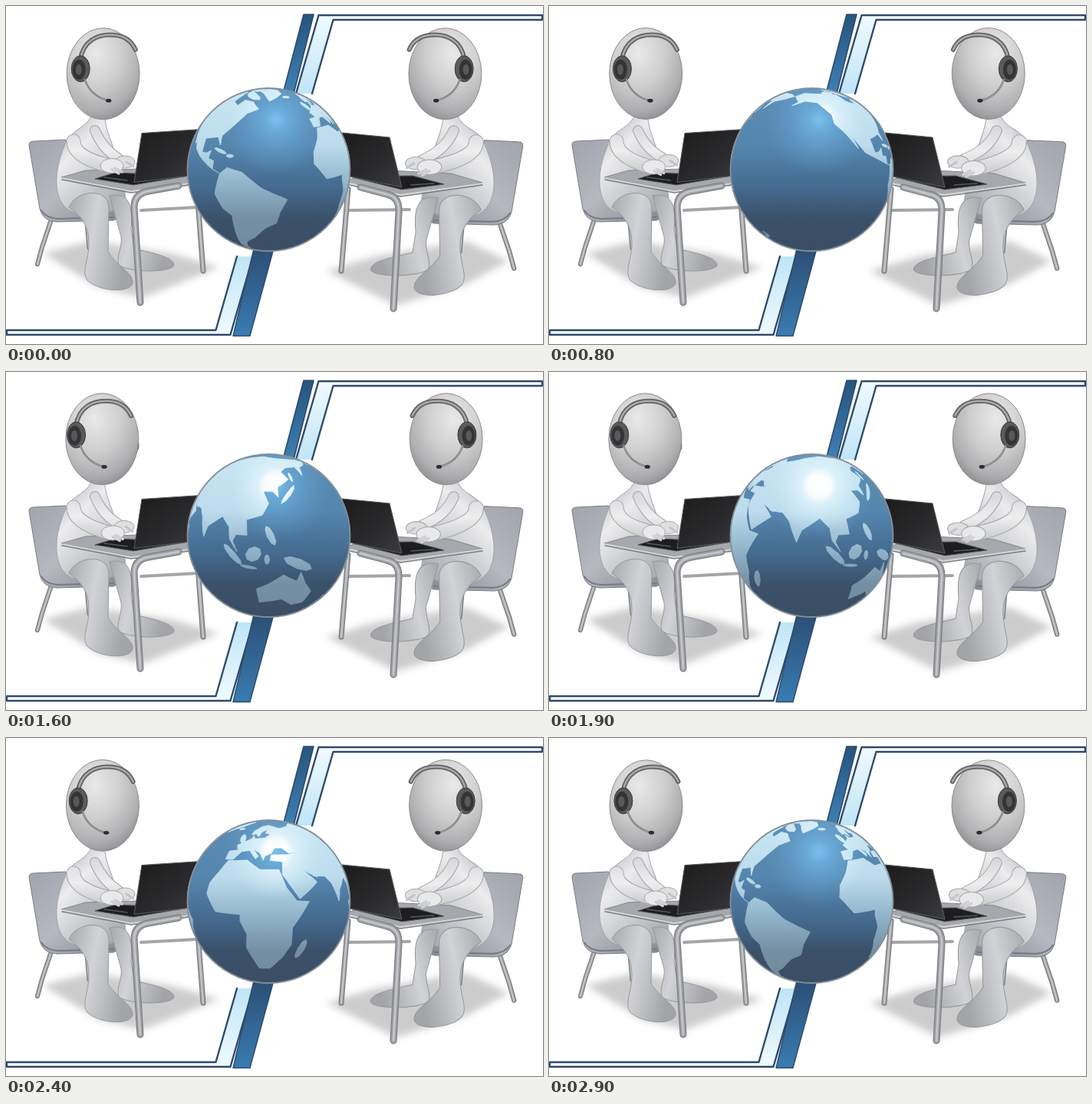
These frames come from a looping animation (700x440 px, 3000 ms). An HTML page:

```html
<!DOCTYPE html>
<html lang="en">
<head>
<meta charset="utf-8">
<title>Online support</title>
<style>
html, body { margin: 0; width: 100%; height: 100%; overflow: hidden; background: #fff; }
svg { display: block; width: 700px; height: 440px; }
</style>
</head>
<body>
<svg id="stage" viewBox="0 0 700 440" xmlns="http://www.w3.org/2000/svg">
<defs>
  <radialGradient id="skin" cx=".4" cy=".28" r=".78">
    <stop offset="0" stop-color="#e9e9e9"/><stop offset=".45" stop-color="#cfcfd0"/>
    <stop offset=".8" stop-color="#aeaeb0"/><stop offset="1" stop-color="#8a8a8d"/>
  </radialGradient>
  <linearGradient id="torso" x1="66" x2="156" y1="160" y2="250" gradientUnits="userSpaceOnUse">
    <stop offset="0" stop-color="#b9babd"/><stop offset=".3" stop-color="#ececee"/><stop offset="1" stop-color="#a9abb0"/>
  </linearGradient>
  <linearGradient id="leg" x1="0" x2="1" y1="0" y2=".3">
    <stop offset="0" stop-color="#a6a8ac"/><stop offset=".45" stop-color="#d2d3d6"/><stop offset="1" stop-color="#a2a4a8"/>
  </linearGradient>
  <linearGradient id="arm" x1="0" x2="0" y1="155" y2="222" gradientUnits="userSpaceOnUse">
    <stop offset="0" stop-color="#d6d7d9"/><stop offset=".5" stop-color="#eeeeef"/><stop offset="1" stop-color="#c2c3c6"/>
  </linearGradient>
  <linearGradient id="chair" x1="0" x2="1" y1="0" y2="1">
    <stop offset="0" stop-color="#a2a4ad"/><stop offset=".5" stop-color="#b6b8c0"/><stop offset="1" stop-color="#85878f"/>
  </linearGradient>
  <linearGradient id="screen" x1="0" x2="1" y1="0" y2="1">
    <stop offset="0" stop-color="#1b1b1c"/><stop offset=".6" stop-color="#2b2b2d"/><stop offset="1" stop-color="#3c3c3f"/>
  </linearGradient>
  <linearGradient id="bandTop" x1="0" x2="0" y1="0" y2="1">
    <stop offset="0" stop-color="#25557f"/><stop offset="1" stop-color="#3f80b3"/>
  </linearGradient>
  <linearGradient id="bandLow" x1="0" x2="0" y1="0" y2="1">
    <stop offset="0" stop-color="#2b4d72"/><stop offset="1" stop-color="#397cb2"/>
  </linearGradient>
  <linearGradient id="pale" x1="0" x2="0" y1="0" y2="1">
    <stop offset="0" stop-color="#f0fafe"/><stop offset="1" stop-color="#bfe5f6"/>
  </linearGradient>
  <linearGradient id="sea" x1="0" x2="0" y1="0" y2="1">
    <stop offset="0" stop-color="#5c8cb3"/><stop offset=".35" stop-color="#5586ae"/>
    <stop offset=".62" stop-color="#44698d"/><stop offset=".8" stop-color="#3a516a"/><stop offset="1" stop-color="#3a4e64"/>
  </linearGradient>
  <radialGradient id="seaGlow" cx="352" cy="148" r="72" gradientUnits="userSpaceOnUse">
    <stop offset="0" stop-color="#7cc0ee"/><stop offset=".2" stop-color="#6dafde" stop-opacity=".9"/>
    <stop offset="1" stop-color="#5f9ac8" stop-opacity="0"/>
  </radialGradient>
  <linearGradient id="land" x1="0" x2="0" y1="107" y2="319" gradientUnits="userSpaceOnUse">
    <stop offset="0" stop-color="#c9e6f3"/><stop offset=".35" stop-color="#bcdcec"/>
    <stop offset=".6" stop-color="#8fb2c8"/><stop offset=".8" stop-color="#748fa4"/><stop offset="1" stop-color="#71899c"/>
  </linearGradient>
  <radialGradient id="landGlow" cx="352" cy="148" r="62" gradientUnits="userSpaceOnUse">
    <stop offset="0" stop-color="#fff"/><stop offset=".25" stop-color="#fff" stop-opacity=".9"/>
    <stop offset=".4" stop-color="#e2f5fd" stop-opacity=".75"/><stop offset="1" stop-color="#d3effb" stop-opacity="0"/>
  </radialGradient>
  <filter id="soft" x="-20%" y="-20%" width="140%" height="140%"><feGaussianBlur stdDeviation="5"/></filter>
</defs>
<g id="scene"></g>
</svg>
<script>
// Coarse coastlines as longitude, latitude pairs
const northAmerica = [-168,66,-156,71,-95,68,-94,59,-82,55,-78,61,-65,59,-56,52,-66,48,-70,43,-76,36,-81,31,-80,25,
  -84,30,-97,28,-96,19,-91,19,-87,21,-88,16,-83,15,-83,10,-77,8,-86,11,-97,16,-105,20,-113,31,-110,23,-118,34,
  -124,40,-124,47,-135,58,-150,60,-164,55,-158,59];
const greenland = [-45,60,-54,70,-68,76,-45,83,-18,78,-22,70];
const southAmerica = [-77,8,-72,12,-62,10,-50,1,-35,-6,-39,-14,-41,-22,-48,-26,-57,-36,-65,-42,-68,-50,-68,-55,
  -74,-50,-71,-30,-70,-18,-76,-14,-81,-5];
const africa = [-6,36,10,37,20,31,33,31,37,20,43,12,51,11,40,-4,40,-15,35,-24,27,-34,19,-34,12,-17,13,-8,9,0,9,4,
  -8,4,-17,14,-16,21,-10,29];
const europe = [-9,37,-9,43,-1,44,-4,48,8,54,9,57,12,54,22,55,28,59,22,60,25,65,17,61,15,56,11,59,6,58,6,62,15,69,
  26,71,42,66,60,69,61,44,42,42,37,46,31,46,28,42,23,40,22,37,19,42,13,45,18,40,16,38,10,44,3,43,-2,37];
const asia = [59,69,72,73,105,77,140,72,180,69,190,66,178,62,163,59,157,51,156,60,142,59,135,55,140,48,129,42,129,35,
  125,39,118,39,122,31,118,24,108,21,109,12,102,12,100,8,103,2,98,9,97,16,91,22,80,15,77,8,72,20,67,25,57,26,59,45];
const nearEast = [61,45,60,25,50,30,56,25,59,22,45,13,35,28,36,36,27,37,28,41,41,41];
const australia = [114,-22,122,-18,131,-12,136,-15,140,-17,142,-11,146,-19,153,-27,150,-37,140,-38,131,-31,115,-34];

// Island: an ellipse with half axes and turn, all in degrees
function island(lon, lat, a, b, turn) {
  const pts = [], t = turn * rad;
  for (let i = 0; i < 8; i++) {
    const u = a * Math.cos(i * Math.PI / 4), v = b * Math.sin(i * Math.PI / 4);
    pts.push(lon + (u * Math.cos(t) - v * Math.sin(t)) / Math.cos(lat * rad), lat + u * Math.sin(t) + v * Math.cos(t));
  }
  return pts;
}

const CX = 342.5, CY = 213, R = 106, CAM = 5, LOOP = 3000, STEP = 100;
const rad = Math.PI / 180, tilt = 12 * rad;

const caribbean = [island(-79, 21.5, 5, 1, -15), island(-71, 19, 2.5, 1, 0)];
const arctic = [island(-75, 68, 9, 3, -45), island(-80, 79, 5, 4, 0), island(-110, 71, 4, 3, 0)];
const atlantic = [island(-2, 54, 4.5, 1.8, 110), island(-19, 65, 2.5, 1.3, 0), island(47, -19, 7, 2.4, 70)];
const pacific = [island(137, 37, 8, 1.3, 50), island(143, 50, 4, .8, 90), island(176, -39, 3, 1.4, -50), island(171, -44, 4.5, 1.3, 45)];
const indies = [island(123, 12, 6, 2, 115), island(113, 1, 5, 4, 40), island(100, 0, 8, 2, -45),
  island(110, -7, 5, .8, -8), island(121, -2, 3, 1.5, 90), island(140, -5.5, 10, 3, -25)];
const coasts = [northAmerica, greenland, southAmerica, africa, europe, asia, nearEast, australia,
  ...caribbean, ...arctic, ...atlantic, ...pacific, ...indies];

const line = (d, color, w) =>
  `<path d="${d}" fill="none" stroke="${color}" stroke-width="${w}" stroke-linecap="round" stroke-linejoin="round"/>`;
const area = (d, fill, stroke = 'none', w = 1) =>
  `<path d="${d}" fill="${fill}" stroke="${stroke}" stroke-width="${w}" stroke-linejoin="round"/>`;
const oval = (x, y, rx, ry, fill, stroke = 'none') =>
  `<ellipse cx="${x}" cy="${y}" rx="${rx}" ry="${ry}" fill="${fill}" stroke="${stroke}"/>`;
const disc = more => `<circle cx="${CX}" cy="${CY}" r="${R}" ${more}/>`;
const tube = (d, w) => line(d, '#77797c', w) + line(d, '#9b9da0', w - 2) + line(d, '#c3c5c8', w / 3);
const limb = (d, w) => line(d, '#a5a7ab', w) + line(d, 'url(#arm)', w - 2);

function ribbons() {
  const navy = '#2f4a6c';
  const pale = area('M379,114 L408,13 H426 L399,114Z', 'url(#pale)') +
    line('M378,114 L407.5,12 H699 V18 H426.5 L399,114', navy, 2.4);
  return area('M361,114 L388,11 H401 L375,114Z', 'url(#bandTop)', navy, 1.6) + pale +
    `<g transform="rotate(180 350 220)">${pale}</g>` +
    area('M324,312 L296,429.5 H318 L350,312Z', 'url(#bandLow)', navy, 1.4);
}

function body() {
  return tube('M58,281 Q53,296 47,314 L41,336', 6) + tube('M105,282 L108,315', 5) +
    area('M30,181 Q30,176 36,176 L78,174 L90,255 L148,262 Q151,276 140,279 L66,281 Q48,280 44,264Z', 'url(#chair)', '#7c7e86') +
    line('M46,266 Q52,276 68,277 L140,275', '#787b84', 2) +
    area('M112,140 C108,158 86,160 79,176 C70,195 61,225 69,248 C75,268 95,274 120,272 L155,262 C160,245 146,215 142,195 C140,178 130,166 128,140Z', 'url(#torso)', '#a4a6aa') +
    area('M135,247 C165,240 165,270 163,290 L167,316 C190,321 220,327 219,338 C212,348 160,347 147,337 C143,326 152,315 150,300Z', 'url(#leg)', '#97999d') +
    area('M82,262 C92,238 135,236 134,264 L133,320 C146,340 167,348 165,361 C160,375 120,371 106,357 C98,346 108,330 108,310 C108,290 102,276 82,262Z', 'url(#leg)', '#97999d');
}

const arms = () => '<g class="far"></g><g class="near"></g>';

function head() {
  const band = 'M94,70 C98,46 116,36 138,38 C152,39 161,46 166,57', boom = 'M100,96 C105,111 114,119 129,123';
  return `<g class="head"><g class="ear">${oval(168.5, 96, 4, 9, '#444')}</g>
    ${oval(126, 88, 47.5, 59.5, 'url(#skin)', '#8d8d90')}
    <g class="set">${line(band, '#626264', 6)}${line(band, '#a9a9ab', 2.5)}
    ${oval(94.5, 82, 12, 17, '#5a5a5c', '#3b3b3c')}${oval(92.5, 83, 8.5, 13, '#343436')}${oval(92, 83, 4, 7, '#59595b')}
    ${line(boom, '#77777a', 2.4)}${line(boom, '#b5b5b7', .8)}
    ${oval(131, 123.5, 3.6, 2.4, '#2c2c2d')}</g></g>`;
}

function leftDesk() {
  return line('M176,266 L250,262', '#a3a5a8', 4) + tube('M249,240 L257,345', 7) +
    area('M72,223 L104,214 L175,212 L245,222 L240,232 L163,240Z', '#a5a8ac', '#85878b') +
    line('M73,224 L163,241 L240,231', '#d2d4d6', 2) + line('M73,226 L163,243 L240,233', '#7b7d80', 1.5) +
    tube('M225,234 L186,241 Q167,244 167,262 L175,386', 9) +
    area('M116,225 L142,217 L238,221 L166,233Z', '#1d1d1f', '#555') + line('M128,223 L158,227', '#55585c', 1.5);
}

function rightDesk() {
  return line('M444,266 L526,265', '#a3a5a8', 4) + tube('M446,238 L437,345', 7) +
    area('M446,226 L500,214 L580,218 L621,230 L514,246 L448,231Z', '#a5a8ac', '#85878b') +
    line('M448,231 L514,246 L621,231', '#d2d4d6', 2) + line('M448,233 L514,248 L621,233', '#7b7d80', 1.5) +
    tube('M462,236 L496,245 Q513,248 512,268 L505,394', 9) +
    area('M448,222 L530,221 L571,232 L516,239Z', '#1d1d1f', '#555') + line('M528,233 L558,231', '#55585c', 1.5);
}

const leftScreen = area('M177,165.5 L254,160.5 L240,221 L167,229.5Z', 'url(#screen)', '#5d5d60');
const rightScreen = area('M438,165 L500,171 L516,236 L448,222Z', 'url(#screen)', '#5d5d60');
const flip = 'translate(573 148) scale(-1.05 1.03) translate(-126 -148)';

document.getElementById('scene').innerHTML =
  `<g filter="url(#soft)" fill="#c4c4c5" opacity=".85">
     <path d="M48,322 L110,306 L215,322 L278,340 L178,380 L120,366Z"/>
     <path d="M418,345 L480,326 L600,306 L655,332 L600,362 L508,390Z"/></g>
   ${ribbons()}
   <g id="left">${body()}${leftDesk()}${arms()}${leftScreen}${head()}</g>
   <g id="right"><g transform="${flip}">${body()}</g>${rightDesk()}
     <g transform="${flip}">${arms()}</g>${rightScreen}
     <g transform="translate(699 0) scale(-1 1)">${head()}</g></g>
   ${disc('fill="url(#sea)"')}${disc('fill="url(#seaGlow)"')}
   <path id="ground" fill="url(#land)" stroke="url(#land)" stroke-width="1" stroke-linejoin="round"/>
   <path id="shine" fill="url(#landGlow)"/>
   ${disc('fill="none" stroke="#858e97" stroke-width="1.8"')}`;

// Perspective view of a globe point; hidden points slide out to the rim
function project(lon, lat, mid) {
  const a = (lon - mid) * rad, b = lat * rad;
  const x = Math.cos(b) * Math.sin(a), c = Math.cos(b) * Math.cos(a), s = Math.sin(b);
  const y = Math.cos(tilt) * s - Math.sin(tilt) * c;
  const z = Math.sin(tilt) * s + Math.cos(tilt) * c;
  const seen = z > 1 / CAM;
  const k = seen ? Math.sqrt(CAM * CAM - 1) / (CAM - z) : 1 / (Math.hypot(x, y) || 1);
  return { seen, at: (CX + R * k * x).toFixed(1) + ',' + (CY - R * k * y).toFixed(1) };
}

function outline(pts, mid) {
  const out = [], n = pts.length, parts = 6;
  let any = false;
  for (let i = 0; i < n; i += 2) {
    const j = (i + 2) % n;
    for (let p = 0; p < parts; p++) {
      const f = p / parts;
      const q = project(pts[i] + (pts[j] - pts[i]) * f, pts[i + 1] + (pts[j + 1] - pts[i + 1]) * f, mid);
      any = any || q.seen;
      out.push(q.at);
    }
  }
  return any ? 'M' + out.join('L') + 'Z' : '';
}

function pose(id, n, gain, base, reach) {
  const el = c => document.querySelector(`#${id} .${c}`);
  const move = (c, x, y) => el(c).setAttribute('transform', `translate(${x} ${y})`);
  const turn = Math.cos((n - 2) / 30 * 2 * Math.PI);
  const tap = Math.sin(n / 3 * Math.PI), tap2 = Math.cos(n / 3 * Math.PI);
  move('head', .7 * turn, .5 * turn - .2);
  move('set', (gain - .7) * turn + base, -.6 * turn);
  move('ear', base ? -6 : -1.6 * turn, 0);
  const fx = 155 + reach + tap, fy = 200 + tap2;
  const nx = 138 + reach - 1.5 * tap, ny = 209 - tap2;
  el('far').innerHTML = limb(`M116,162 Q126,186 ${fx - 8},${fy - 2}`, 14) +
    oval(fx, fy + 2, 13, 8, '#dfdfe1', '#a5a7ab') + line(`M${fx + 2},${fy + 2} l9,6`, '#c4c5c8', 3);
  el('near').innerHTML = limb(`M88,176 Q88,196 ${nx - 8},${ny - 1}`, 19) +
    oval(nx, ny, 15, 9.5, '#e9e9eb', '#a5a7ab') + line(`M${nx + 4},${ny + 3} l9,5 M${nx},${ny + 5} l9,5`, '#cfd0d2', 3.5);
}

const ground = document.getElementById('ground'), shine = document.getElementById('shine');
let last = -1;

function draw(ms) {
  const n = Math.floor(ms % LOOP / STEP);
  if (n === last) return;
  last = n;
  const d = coasts.map(c => outline(c, -46 - 12 * n)).join('');
  ground.setAttribute('d', d);
  shine.setAttribute('d', d);
  pose('left', n, 3, 0, 0);
  pose('right', n, 2, 5.5, 8);
}

const start = performance.now();
function tick() {
  draw(performance.now() - start);
  requestAnimationFrame(tick);
}
draw(0);
requestAnimationFrame(tick);
</script>
</body>
</html>
```
